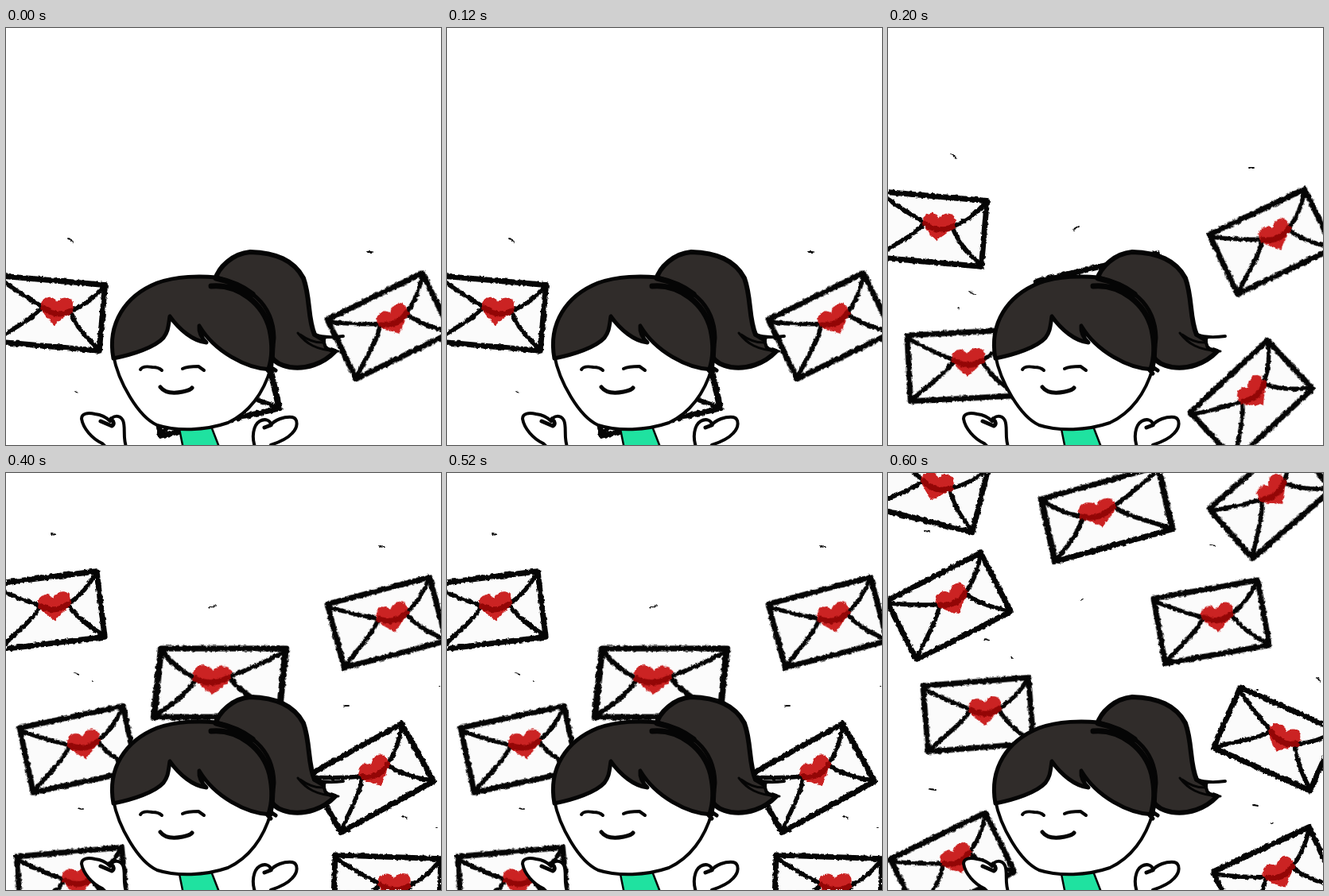
An HTML page without scripts that plays this animation: 547 by 525 pixels, repeating every 800 ms.

```html
<!DOCTYPE html>
<html lang="en">
<head>
<meta charset="utf-8">
<title>Love letters</title>
<style>
  html, body { margin: 0; width: 100%; height: 100%; overflow: hidden; background: #fff; }
  svg { display: block; width: 100%; height: 100%; }
  path { fill: none; stroke: #050505; stroke-linecap: round; stroke-linejoin: round; }
  .step { visibility: hidden; filter: url(#rough); animation: show .8s step-end infinite; }
  .s1 { animation-delay: -.8s; }
  .s2 { animation-delay: -.6s; }
  .s3 { animation-delay: -.4s; }
  .s4 { animation-delay: -.2s; }
  .specks { stroke-width: 1.8; }
  .white { fill: #fff; }
  .hair { fill: #302c2a; }
  @keyframes show {
    0% { visibility: visible; }
    25%, 100% { visibility: hidden; }
  }
</style>
</head>
<body>
<svg viewBox="0 0 547 525">
  <defs>
    <filter id="rough" filterUnits="userSpaceOnUse" x="0" y="0" width="547" height="525" color-interpolation-filters="sRGB">
      <feTurbulence type="fractalNoise" baseFrequency=".22" numOctaves="2" seed="4"/>
      <feDisplacementMap in="SourceGraphic" scale="4" xChannelSelector="R" yChannelSelector="G"/>
    </filter>
    <!-- Envelope, 133 x 83, hung from its first corner -->
    <g id="mail">
      <path d="M0 0H133V83H0Z" style="fill:#fbfbfb" stroke-width="7"/>
      <path d="M1 4Q30 22 57 34Q76 47 95 35Q116 24 131 3" stroke-width="5.5"/>
      <path d="M2 81C20 66 45 52 56 36M93 38C101 54 116 69 131 80" stroke-width="5.5"/>
      <path d="M74 56C67 49 55 42 55 30C57 20 70 18 75 27C81 17 95 18 96 29C95 41 82 47 74 56Z" style="fill:#cb2323;stroke:none"/>
      <path d="M58 35Q76 47 93 36" style="stroke:#930606" stroke-width="7"/>
    </g>
  </defs>

  <g class="step s1">
    <use href="#mail" transform="translate(-8 312) rotate(5)"/>
    <use href="#mail" transform="translate(404 367) rotate(-26)"/>
    <use href="#mail" transform="translate(325 398) rotate(-13) scale(-1.15 1)"/>
    <path class="specks" d="M79 265l6 4M454 282h7M88 458l1 .5"/>
  </g>

  <g class="step s2">
    <use href="#mail" transform="translate(-8 206) rotate(5)"/>
    <use href="#mail" transform="translate(404 260) rotate(-25.5)"/>
    <use href="#mail" transform="translate(338 284) rotate(-13) scale(-1.16 1)"/>
    <use href="#mail" transform="translate(24 387) rotate(-3)"/>
    <use href="#mail" transform="translate(380 484) rotate(-43)"/>
    <path class="specks" d="M79 159l6 4M454 176h7M233 254l7-4M103 332l6 3M88 352l1 .5"/>
  </g>

  <g class="step s3">
    <use href="#mail" transform="translate(-18 140) rotate(-7)"/>
    <use href="#mail" transform="translate(404 165) rotate(-14.8)"/>
    <use href="#mail" transform="translate(352 221) skewX(-6) scale(-1.18 1.04)"/>
    <use href="#mail" transform="translate(17 321) rotate(-12)"/>
    <use href="#mail" transform="translate(381 380) rotate(-29)"/>
    <use href="#mail" transform="translate(13 483) rotate(-5)"/>
    <use href="#mail" transform="translate(414 481) rotate(2)"/>
    <path class="specks" d="M57 77l6 1M470 92l6 1M256 170l7-3M86 252l6 2M109 262h1M425 293h6M499 432l5 3M91 422l6 2M541 447h1M545 269h1"/>
  </g>

  <g class="step s4">
    <use href="#mail" transform="translate(-3 -38) rotate(14)"/>
    <use href="#mail" transform="translate(404 45) rotate(-41)"/>
    <use href="#mail" transform="translate(340 -8) rotate(-15.5) skewX(-3) scale(-1.15 .97)"/>
    <use href="#mail" transform="translate(-2 161) rotate(-27)"/>
    <use href="#mail" transform="translate(334 158) rotate(-10)"/>
    <use href="#mail" transform="translate(44 268) rotate(-4.5)"/>
    <use href="#mail" transform="translate(443 270) rotate(24)"/>
    <use href="#mail" transform="translate(3 486) rotate(-26)"/>
    <use href="#mail" transform="translate(409 502) rotate(-25)"/>
    <path class="specks" d="M46 73l6 1M405 90l6 2M243 160l2-1M122 209l6 2M155 232h1M540 258l3 4M53 398l7 1M459 418l7 1M482 441h1M71 123l2 2M464 273h1"/>
  </g>

  <!-- Body -->
  <path d="M217 500L223 530H269L257 499Z" style="fill:#1fe2a0" stroke-width="2.5"/>

  <!-- Ponytail -->
  <g stroke-width="6">
    <path class="hair" d="M263 317C267 301 285 284 307 282C339 283 362 292 374 315C383 340 379 365 388 386L400 393L403 403L414 407C399 423 377 430 357 427C346 425 338 421 334 414Z"/>
    <path d="M387 386Q402 391 424 388" stroke-width="4"/>
    <path d="M367 384C377 397 390 406 418 407M370 386Q385 397 400 396" stroke-width="3"/>
    <path class="white" d="M402 392L411 392Q404 397 409 403Q401 402 402 392Z" style="stroke:none"/>
  </g>

  <!-- Head -->
  <path class="white" d="M135 412C141 445 166 489 190 500C215 508 250 507 279 497C305 485 324 460 333 428L320 350H160Z" stroke-width="4"/>
  <path class="hair" d="M135 416C127 372 150 337 190 321C215 312 245 312 264 314C304 325 336 345 337 390L333 430C302 429 262 407 243 375C242 384 246 390 252 396C235 394 218 380 206 363C204 376 204 382 198 390C187 402 160 411 135 416Z" stroke-width="5"/>
  <path d="M258 325C292 322 324 347 332 380Q338 408 331 429M264 315Q292 321 310 335" stroke-width="7"/>
  <path d="M333 427l6 4M329 431l4 4" stroke-width="5"/>

  <!-- Face -->
  <path d="M169 430C171 426 178 426 184 427Q192 427 196 431M222 429C228 426 235 426 242 426L249 431" stroke-width="4"/>
  <path d="M194 452C200 460 212 460 222 458Q232 456 234 453" stroke-width="5"/>

  <!-- Hands -->
  <g stroke-width="4">
    <path class="white" d="M128 530L121 523C108 517 97 504 95 492C95 485 103 484 112 486C121 487 127 491 131 495C134 487 143 487 147 494C151 503 146 516 152 530Z"/>
    <path d="M119 495L133 501Q138 498 132 492" stroke-width="5"/>
    <path class="white" d="M314 530C308 515 311 500 319 495C326 491 333 494 333 500C338 493 350 489 360 490C368 492 367 503 360 510C353 518 342 522 333 525L330 530Z"/>
    <path d="M325 503L333 500" stroke-width="5"/>
  </g>
</svg>
</body>
</html>
```
